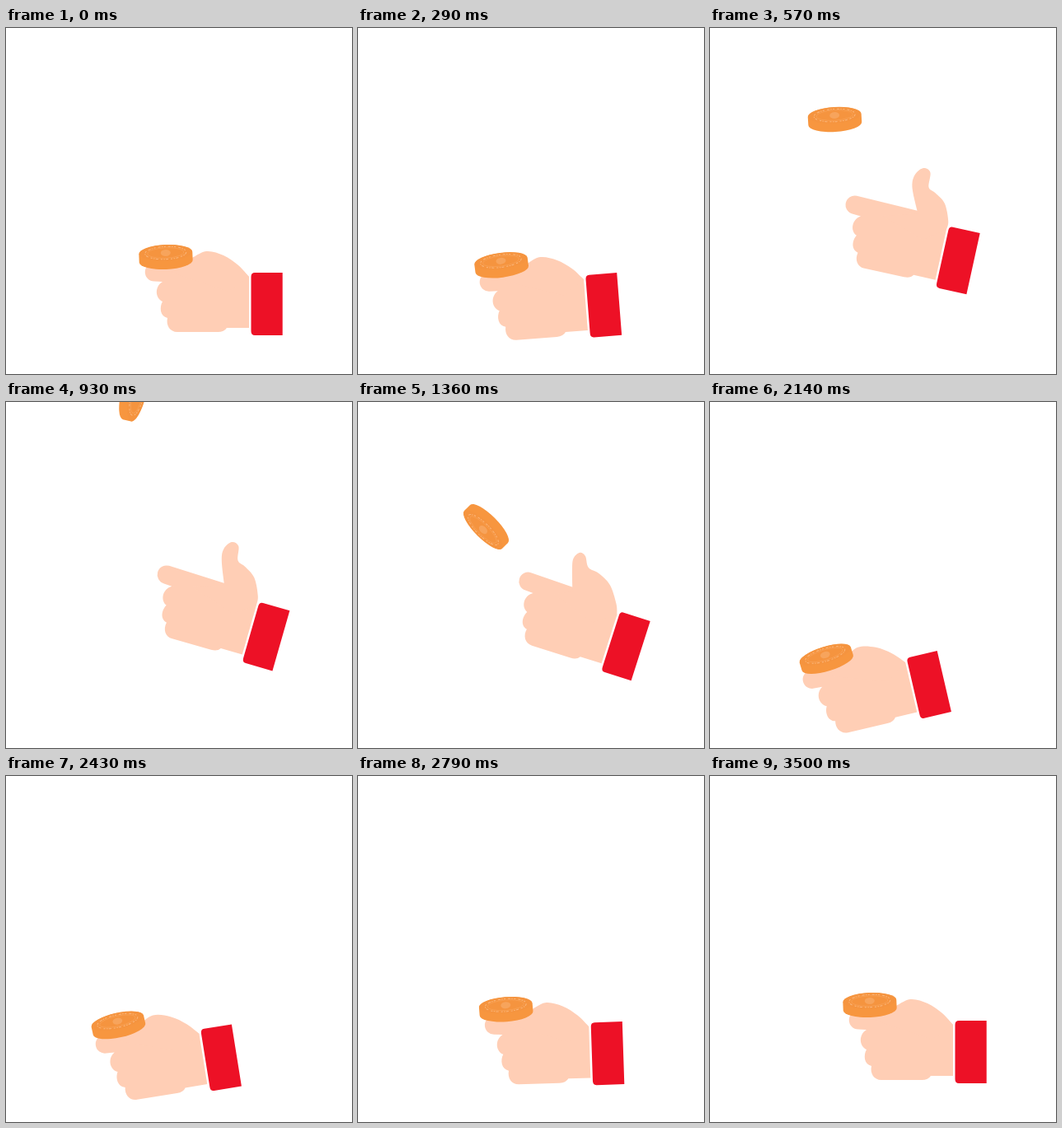
An HTML page for the animation above (3570 ms loop, 420 by 420 pixels).

```html
<!DOCTYPE html>
<html lang="en">
<head>
<meta charset="utf-8">
<title>Coin toss</title>
<style>
  html, body { margin: 0; width: 100%; height: 100%; overflow: hidden; background: #fff; }
  svg { display: block; width: 100vw; height: 100vh; }
</style>
</head>
<body>
<svg viewBox="0 0 420 420">
  <g id="hand">
    <g fill="#ffceb5">
      <path d="M180 285A11 11 0 0 0 180 307.500L190 308C180 314 181 328 190 332C186 339 187 350 196 352C194 361 199 369 208 369H257Q265 369 268 364H295V302Q286 291 262 287Z"/>
      <path id="thumb"/>
    </g>
    <path fill="#ed1126" d="M335.700 297H302Q297.500 297 297.500 302V368Q297.500 373 302 373H335.700Z"/>
  </g>
  <g id="coin">
    <path fill="#f7963f" d="M-32.500 -5A32.500 10 0 0 1 32.500 -5V5A32.500 10 0 0 1 -32.500 5Z"/>
    <ellipse cy="-5" rx="32" ry="9.700" fill="#f5943f"/>
    <g fill="none" stroke="#fbb67a">
      <ellipse cy="-5" rx="25" ry="7.700" stroke-width="1" stroke-dasharray="3 1.200 1.500 1.500 2 3"/>
      <ellipse cy="-5" rx="22" ry="6.200" stroke-width=".3"/>
    </g>
    <ellipse cy="-5" rx="6" ry="4" fill="#f7a45c"/>
  </g>
</svg>
<script>
const LOOP = 3570, STEPS = 50, LAUNCH = 5, CATCH = 27;
const CORNER = [336, 297], PIVOT = [262, 290];
const [hand, thumb, coin] = ['hand', 'thumb', 'coin'].map(id => document.getElementById(id));

// Step, cuff corner x, y, tilt, thumb raise
const handKeys = [
  [0, ...CORNER, 0, 0],
  [LAUNCH, 312, 297, -5, 0],
  [8, 328, 249, 12.4, 1],
  [19, 355, 266, 17.7, .61],
  [23, 335, 286, -9.8, .1],
  [CATCH, 264, 316, -13.5, 0],
  [30, 276, 302, -13.1, 0],
  [32, 267, 302, -11.5, 0],
  [42, ...CORNER, 0, 0]
];

const folded = [[200, 296], [198, 286], [200, 277], [207, 273], [215, 277], [223, 280], [243, 271], [264, 276], [282, 288]];
const raised = [[257, 290], [244, 262], [243, 246], [251, 235], [261, 238], [263, 256], [272, 261], [286, 271], [295, 291]];

const mix = (a, b, f) => a + (b - a) * f;

// Monotone cubic through the keys, holding the last one
function sample(keys, t) {
  const last = keys.length - 1;
  if (t >= keys[last][0]) return keys[last].slice(1);
  const i = keys.findIndex(k => k[0] > t) - 1;
  const a = keys[i], b = keys[i + 1], span = b[0] - a[0], u = (t - a[0]) / span;
  const rate = (k, c) => keys[k] && keys[k + 1]
    ? (keys[k + 1][c] - keys[k][c]) / (keys[k + 1][0] - keys[k][0]) : 0;
  const slope = (k, c) => {
    const p = rate(k - 1, c), q = rate(k, c);
    return p * q > 0 ? 2 * p * q / (p + q) : 0;
  };
  return a.slice(1).map((from, j) => mix(from, b[j + 1], u * u * (3 - 2 * u))
    + span * u * (1 - u) * ((1 - u) * slope(i, j + 1) - u * slope(i + 1, j + 1)));
}

// The coin on the finger slides a little as the hand tilts
function heldCoin(t) {
  const [x, y, tilt] = sample(handKeys, t);
  const a = tilt * Math.PI / 180, dx = -142, dy = -19;
  return [
    x + dx * Math.cos(a) - dy * Math.sin(a) - .6 * tilt,
    y + dx * Math.sin(a) + dy * Math.cos(a) + .3 * tilt,
    1.1 * tilt - 2.5
  ];
}

// Step, centre x, y, spin; one full turn between launch and catch
const [launchX, launchY, launchSpin] = heldCoin(LAUNCH);
const flightKeys = [
  [LAUNCH, launchX, launchY, launchSpin - 360],
  [8, 151.5, 111, -363.5],
  [11, 154, -30, -300],
  [19, 155.5, 151.5, -135],
  [23, 156, 224, -90],
  [CATCH, ...heldCoin(CATCH)]
];

// Swings each outline point around the thumb joint
function swing(from, to, f) {
  const polar = ([x, y]) => {
    const dx = x - PIVOT[0], dy = y - PIVOT[1];
    return [Math.hypot(dx, dy), Math.atan2(dy, dx)];
  };
  const [r0, a0] = polar(from), [r1, a1] = polar(to);
  const r = mix(r0, r1, f), a = mix(a0, a1, f);
  return [PIVOT[0] + r * Math.cos(a), PIVOT[1] + r * Math.sin(a)];
}

function thumbPath(raise) {
  const pts = folded.map((p, i) => swing(p, raised[i], raise));
  pts.push([295, 302]);
  let d = 'M' + pts[0];
  for (let k = 0; k < pts.length - 1; k++) {
    const q = pts[k], r = pts[k + 1], p = pts[k - 1] || q, s = pts[k + 2] || r;
    const near = q.map((v, c) => v + (r[c] - p[c]) / 6);
    const far = r.map((v, c) => v - (s[c] - q[c]) / 6);
    d += `C${near} ${far} ${r}`;
  }
  return d + 'L270 320L215 302Z';
}

function draw(now) {
  const t = Math.floor((now % LOOP + 5) / LOOP * STEPS) % STEPS;
  const [hx, hy, tilt, raise] = sample(handKeys, t);
  const flying = t > LAUNCH && t < CATCH;
  const [cx, cy, spin] = flying ? sample(flightKeys, t) : heldCoin(t);
  hand.setAttribute('transform', `translate(${hx} ${hy}) rotate(${tilt}) translate(${-CORNER[0]} ${-CORNER[1]})`);
  thumb.setAttribute('d', thumbPath(raise));
  coin.setAttribute('transform', `translate(${cx} ${cy}) rotate(${spin})`);
}

const start = performance.now();
function tick() {
  draw(performance.now() - start);
  requestAnimationFrame(tick);
}
tick();
</script>
</body>
</html>
```
